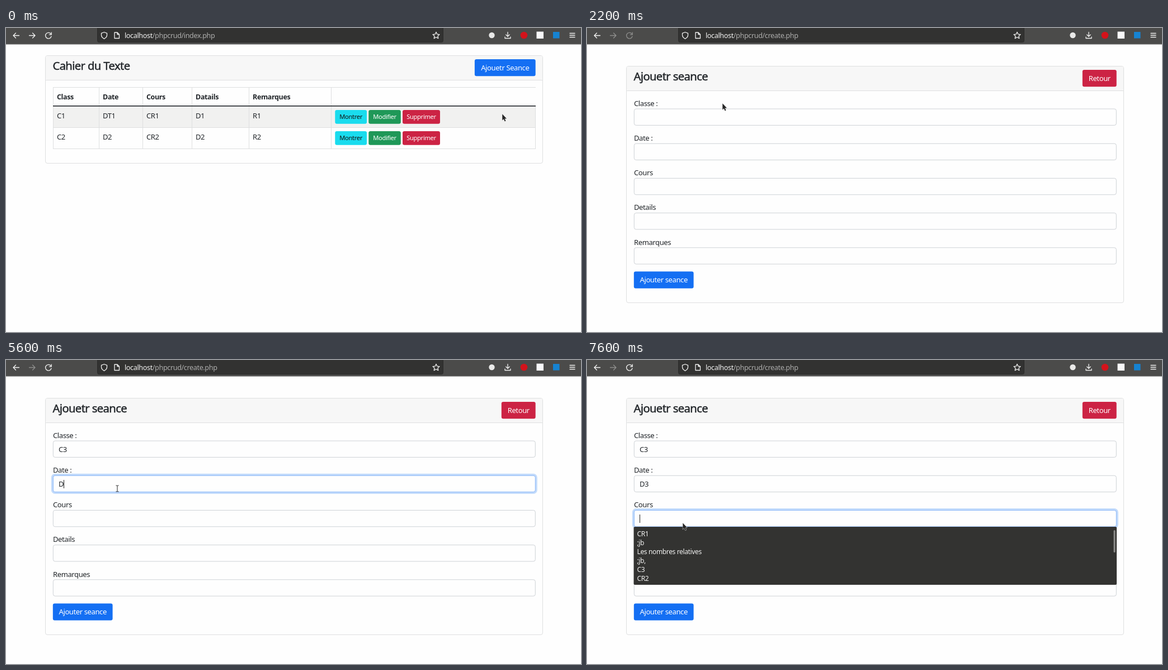
Recreate the animation shown at these times as an HTML page. Size 1028 by 545 pixels, loop 8000 ms.

```html
<!DOCTYPE html>
<html lang="fr">
<head>
<meta charset="utf-8">
<title>Cahier du Texte</title>
<style>
  html, body { margin: 0; width: 100%; height: 100%; overflow: hidden; background: #fefefe; }
  svg { display: block; width: 1028px; height: 545px; }
  text { font: 13px "Noto Sans", "Open Sans", sans-serif; letter-spacing: -.03em; fill: #212529; white-space: pre; }
  .title { font-size: 20.2px; stroke: #212529; stroke-width: .45px; }
  .head { font-size: 12.5px; font-weight: 700; }
  .small { font-size: 11.2px; }
  .url { font-size: 12.6px; fill: #f4f4f3; }
  .item { font-size: 12px; fill: #f3f3f2; }
  .mid { text-anchor: middle; }
  .icon { fill: none; stroke: #f2f2f1; stroke-width: 1.3; stroke-linecap: round; stroke-linejoin: round; }
</style>
</head>
<body>
<svg id="stage" viewBox="0 0 1028 545">
  <g id="index"></g>
  <g id="create"></g>
  <g id="bar"></g>
  <g id="live"></g>
</svg>
<script>
const LOOP = 8000, STEP = 100;
const BLUE = '#146ff3', BLUE_HOVER = '#0e5fd5', RED = '#cc2344', GREEN = '#1f9858', CYAN = '#1adcee';
const LINE = '#dedfe0', DARK = '#333331';
const $ = id => document.getElementById(id);

const rect = (x, y, w, h, fill, r = 0, extra = '') =>
  `<rect x="${x}" y="${y}" width="${w}" height="${h}" rx="${r}" fill="${fill}" ${extra}/>`;
const frame = (x, y, w, h, stroke, fill = 'none', r = 3.5) =>
  rect(x + .5, y + .5, w - 1, h - 1, fill, r, `stroke="${stroke}"`);
const text = (x, y, s, cls = '', fill = '') =>
  `<text x="${x}" y="${y}" class="${cls}" ${fill && `style="fill:${fill}"`}>${s}</text>`;
const icon = (d, extra = '') => `<path class="icon" d="${d}" ${extra}/>`;
const button = (x, y, w, h, fill, s, cls = '', color = '#fff') =>
  rect(x, y, w, h, fill, 3.3) +
  text(x + w / 2, Math.round(y + h / 2 + (cls ? 4 : 4.8)), s, 'mid ' + cls, color);

const card = (y, h, title) =>
  frame(70, y, 890, h, LINE, '#fefefe') +
  rect(71, y + 1, 888, 43, '#f7f7f7', 3) +
  rect(71, y + 44, 888, 1, LINE) +
  text(83.5, y + 25.5, title, 'title');

// List page
const cols = [84, 166, 244, 332, 434, 581];
const addButton = fill => button(837.9, 55.9, 108.8, 30.3, fill, 'Ajouetr Seance');
const row = (y, cells) =>
  cells.map((s, i) => text(cols[i] + 7, y + 21.5, s)).join('') +
  button(588.3, y + 7, 56.8, 24.7, CYAN, 'Montrer', 'small', '#111') +
  button(648.3, y + 7, 57.5, 24.7, GREEN, 'Modifier', 'small') +
  button(709, y + 7, 67, 24.7, RED, 'Supprimer', 'small');

$('index').innerHTML =
  card(49, 194, 'Cahier du Texte') + addButton(BLUE) +
  rect(84, 140, 863, 38, '#f1f1f0') +
  [106, 178, 216].map(y => rect(84, y, 863, 1, LINE)).join('') +
  cols.map(x => rect(x, 106, 1, 111, LINE)).join('') +
  rect(946, 140, 1, 77, LINE) +
  rect(84, 139, 863, 1.6, '#212529') +
  ['Class', 'Date', 'Cours', 'Datails', 'Remarques']
    .map((s, i) => text(cols[i] + 7, 128, s, 'head')).join('') +
  row(140, ['C1', 'DT1', 'CR1', 'D1', 'R1']) +
  row(178, ['C2', 'D2', 'CR2', 'D2', 'R2']);

// Form page
const FIELD_H = 30.4;
const fieldTop = i => 144.5 + 62.2 * i;
$('create').innerHTML =
  card(68, 425, 'Ajouetr seance') +
  button(885.8, 75, 60.9, 30.3, RED, 'Retour') +
  ['Classe :', 'Date :', 'Cours', 'Details', 'Remarques'].map((s, i) =>
    text(84, Math.round(fieldTop(i) - 4.7), s) +
    frame(83.8, fieldTop(i), 863, FIELD_H, '#ced2d6', '#fefefe')).join('') +
  button(83.8, 436.4, 106.8, 30.4, BLUE, 'Ajouter seance');

// Browser bar
$('bar').innerHTML =
  rect(0, 0, 1028, 28.6, '#4b4b4a') + rect(0, 28.4, 1028, 1, '#3b3b3a') +
  frame(163, -4, 619, 30, '#2a2a29', '#323231', 3) +
  icon('M23.5 13.5H13M17.5 9L13 13.5 17.5 18') +
  icon('M41.5 13.5H52M47.5 9L52 13.5 47.5 18', 'id="forward"') +
  icon('M80.6 11.2A5.3 5.3 0 1 0 81 15M81.2 8V11.8H77.4', 'id="reload"') +
  icon('M175.5 7.5L180.5 9.3V12.5C180.5 16 178 18 175.5 19.3 173 18 170.5 16 170.5 12.5V9.3Z') +
  icon('M194 8H199L202.5 11.5V18.5H194ZM199 8V11.5H202.5') +
  icon('M769 7.3L770.8 11.2 775 11.6 771.9 14.5 772.8 18.7 769 16.5 765.2 18.7 766.1 14.5 763 11.6 767.2 11.2Z') +
  icon('M897 7.5V15M893.8 12L897 15.2 900.2 12M892 16V18.5H902V16') +
  icon('M1008 9.5H1017M1008 13H1017M1008 16.5H1017') +
  '<circle cx="868.5" cy="13" r="5.2" fill="#e9e9e8"/><circle cx="926" cy="13" r="6.3" fill="#d3131b"/>' +
  rect(948.5, 6.5, 12.5, 12.5, '#f8f8f9') + rect(978, 7, 11.5, 11.5, '#1683d2') +
  `<text x="212" y="18" class="url">localhost<tspan fill="#aeaead" id="path"></tspan></text>`;

// Timed steps: [ms, ...values]
const LOAD = 1500;
const pointer = [
  [0, 887, 154, 'arrow'], [100, 888, 154, 'arrow'], [300, 887, 152, 'arrow'], [400, 884, 145, 'arrow'],
  [500, 879, 134, 'arrow'], [600, 871, 119, 'arrow'], [700, 862, 104, 'arrow'], [800, 852, 88, 'arrow'],
  [900, 843, 75, 'hand'], [1000, 839, 69, 'hand'], [LOAD, 839, 69, 'arrow'], [1600, 795, 76, 'arrow'],
  [1700, 650, 95, 'arrow'], [1800, 480, 114, 'arrow'], [1900, 340, 127, 'arrow'], [2000, 262, 133, 'arrow'],
  [2200, 242, 135, 'arrow'], [2300, 239, 139, 'arrow'], [2400, 233, 149, 'arrow'], [2500, 227, 157, 'arrow'],
  [2600, 225, 160, 'arrow'], [4400, 221, 173, 'arrow'], [4500, 207, 207, 'arrow'], [4600, 199, 230.5, 'beam'],
  [7000, 171, 289, 'arrow'], [7100, 171, 292, 'arrow']
];
const focus = [ // field, glow width
  [0, -1, 0], [2700, 0, 2], [3100, 0, 3], [4800, 1, 1], [4900, 1, 2.5], [5100, 1, 3], [7200, 2, 2], [7300, 2, 3]
];
const values = [
  [0, '', ''], [3300, 'C', ''], [3800, 'C3', ''], [5600, 'C3', 'D'], [6300, 'C3', 'D3']
];
const carets = [ // x, 0 when hidden
  [0, 0], [2700, 94], [3100, 0], [3300, 103], [3800, 0], [4400, 109], [4800, 0], [5100, 94], [5600, 103],
  [6000, 0], [7000, 110], [7100, 0], [7600, 94]
];
const lists = [ // field, items, lit
  [0, 0, []], [3400, 0, ['C1', 'C2', 'C3', 'C4']], [4100, 0, ['C3']], [4800, 0, []],
  [5700, 1, ['D1', 'D2', 'D3', 'DT1']], [6600, 1, ['D3']], [6800, 1, ['D3'], true], [7000, 1, ['D3']],
  [7100, 1, []], [7500, 2, ['CR1', ';jb', 'Les nombres relatives', ';jb,', 'C3', 'CR2']]
];
const at = (steps, t) => steps.filter(s => s[0] <= t).pop().slice(1);

const shapes = {
  arrow: '<path d="M.3.3V11.6L2.8 9.3 4.7 13.4 6.5 12.6 4.6 8.6H8Z" fill="#262626" stroke="#f4f4f4" stroke-width=".9" paint-order="stroke"/>',
  hand: '<path d="M.2 1.2C.2-.2 2.3-.2 2.3 1.2V5.2L6.5 6C7.7 6.3 8 7 7.9 8L7.2 11.5V13.5H.8V12L-3.5 7.8C-4 6.7-2.6 6-1.8 6.8L.2 8.4Z" fill="#fff" stroke="#111"/>',
  beam: '<path d="M-2.5-5.5H-.8L0-4.8.8-5.5H2.5M0-4.8V4.8M-2.5 5.5H-.8L0 4.8.8 5.5H2.5" fill="none" stroke="#222"/>'
};

function dropdown(field, items, lit) {
  if (!items.length) return '';
  const y = Math.round(fieldTop(field) + FIELD_H), h = items.length * 16 + 8;
  return rect(83.5, y, 863.5, h, DARK, 2) +
    (lit ? rect(85, y + 4, 860, 16, '#565654') : '') +
    items.map((s, i) => text(89.5, y + 17 + 16 * i, s, 'item')).join('') +
    (items.length > 5 ? rect(941.5, y + 6, 3, 40, '#8c8c8a', 1.5) : '');
}

function form(t) {
  const [field, glow] = at(focus, t), [caret] = at(carets, t), top = fieldTop(field);
  let out = '';
  if (field >= 0) {
    out += rect(83.8 - glow, top - glow, 863 + 2 * glow, FIELD_H + 2 * glow, '#c3dbfb', 4 + glow) +
      frame(83.8, top, 863, FIELD_H, '#86b5f8', '#fefefe');
  }
  out += at(values, t).map((s, i) => text(94, Math.round(fieldTop(i) + 20), s)).join('');
  if (caret) out += rect(caret, Math.round(top + 8), 1, 15, '#222');
  return out + dropdown(...at(lists, t));
}

function draw(t) {
  const made = t >= LOAD;
  $('index').style.display = made ? 'none' : '';
  $('create').style.display = made ? '' : 'none';
  $('path').textContent = made ? '/phpcrud/create.php' : '/phpcrud/index.php';
  $('forward').style.opacity = made ? .4 : 1;
  $('reload').style.opacity = made && t < 2300 ? .4 : 1;
  const [x, y, kind] = at(pointer, t);
  let out = made ? form(t) : '';
  if (!made && t >= 1100) out += addButton(BLUE_HOVER);
  if (!made && t >= 1200) out += rect(0, 527, 172, 18, DARK) + text(5, 540, 'localhost/phpcrud/create.php', 'item');
  $('live').innerHTML = out + `<g transform="translate(${x} ${y})">${shapes[kind]}</g>`;
}

let last = -1;
function tick() {
  const t = Math.floor(performance.now() % LOOP / STEP) * STEP;
  if (t !== last) draw(last = t);
  requestAnimationFrame(tick);
}
tick();
</script>
</body>
</html>
```
